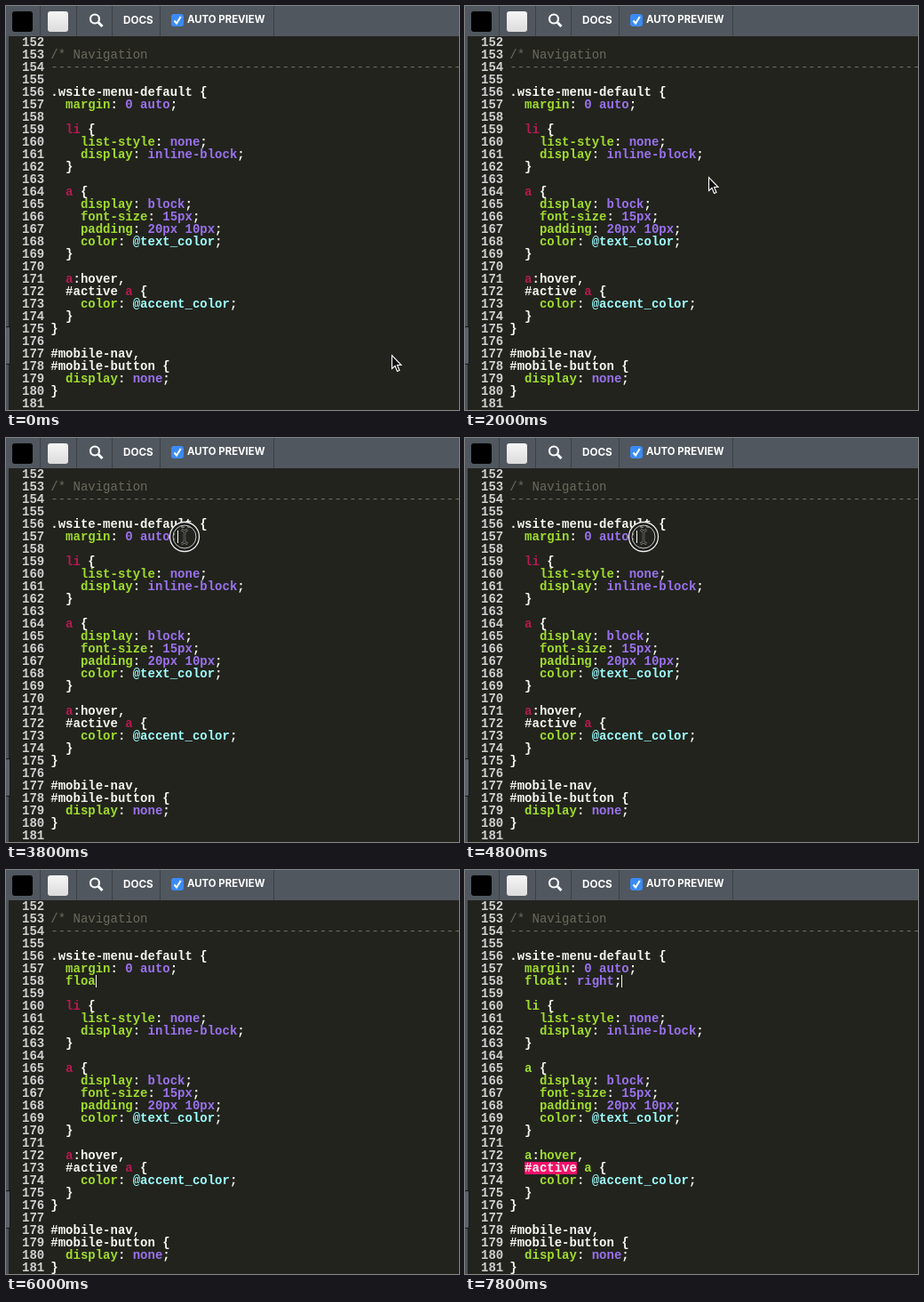
These frames come from a looping animation (510x454 px, 8 s). An HTML page with a canvas:

```html
<!DOCTYPE html>
<html lang="en">
<head>
<meta charset="utf-8">
<title>Code editor</title>
<style>
html, body { margin: 0; width: 510px; height: 454px; overflow: hidden; background: #22231d; }
canvas { display: block; }
</style>
</head>
<body>
<canvas id="stage" width="510" height="454"></canvas>
<script>
const ctx = document.getElementById('stage').getContext('2d');
const LOOP = 8000, STEP = 200;
const LEFT = 50.3, CHAR = 8.4, ROW = 14, TOP = 45, FIRST = 152;
const MONO = '14px "Liberation Mono", "Courier New", monospace';
const WHITE = '#f8f8f2', GREEN = '#a0dc2c', PINK = '#b51a52', PURPLE = '#9a72ee',
      CYAN = '#9effff', GRAY = '#6c6a5e', HOT = '#f5106b';

const code = `
/* Navigation
${'-'.repeat(60)}

.wsite-menu-default {
  margin: 0 auto;

  li {
    list-style: none;
    display: inline-block;
  }

  a {
    display: block;
    font-size: 15px;
    padding: 20px 10px;
    color: @text_color;
  }

  a:hover,
  #active a {
    color: @accent_color;
  }
}

#mobile-nav,
#mobile-button {
  display: none;
}
`.split('\n');

// Pointer path: time, x, y
const path = [[0, 434, 392], [1200, 419, 374], [1400, 394, 342], [1600, 350, 287], [1800, 306, 232],
  [2000, 274, 192], [2400, 257, 146], [2600, 235, 128], [2800, 212, 112], [3000, 196, 102]];

function box(x, y, w, h, fill, r = 0) {
  ctx.fillStyle = fill;
  ctx.beginPath();
  ctx.roundRect(x, y, w, h, r);
  ctx.fill();
}

function line(points, color, width) {
  ctx.strokeStyle = color;
  ctx.lineWidth = width;
  ctx.beginPath();
  points.forEach(p => ctx.lineTo(...p));
  ctx.stroke();
}

function circle(x, y, r, color, width) {
  ctx.strokeStyle = color;
  ctx.lineWidth = width;
  ctx.beginPath();
  ctx.arc(x, y, r, 0, 7);
  ctx.stroke();
}

function label(text, x, y, size) {
  ctx.font = `700 ${size}px Inter, sans-serif`;
  ctx.fillStyle = '#fff';
  ctx.fillText(text, x, y);
}

function toolbar() {
  box(0, 0, 510, 34, '#50575e');
  for (const x of [38, 79, 119, 173, 301]) box(x, 0, 1, 34, '#3a4046');
  box(7, 6, 23, 23, '#000', 3);
  const shade = ctx.createLinearGradient(0, 6, 0, 29);
  shade.addColorStop(0, '#f6f6f6');
  shade.addColorStop(1, '#dcdcdc');
  box(47, 6, 23, 23, shade, 3);
  circle(100, 14.5, 5, '#fff', 2.2);
  line([[103.8, 18.3], [108.5, 23]], '#fff', 3);
  label('DOCS', 132, 20, 11.7);
  box(186, 9, 14, 14, '#3b8bf5', 3);
  line([[189.5, 16.5], [192, 19.5], [196.8, 12]], '#fff', 2);
  label('AUTO PREVIEW', 204, 19, 11.4);
}

// Splits a line into [text, color, background] parts
function tokens(text, row, broken) {
  if (row === 1 || row === 2) return [[text, GRAY]];
  const rule = text.match(/^(\s*[\w-]+)(?:(:)( .*?)?(;?))?$/);
  if (rule) {
    const [, name, colon = '', value = '', end = ''] = rule;
    return [[name, GREEN], [colon, WHITE], [value, value.includes('@') ? CYAN : PURPLE], [end, WHITE]];
  }
  return (text.match(/[.#][\w-]+|[\w-]+|[^\w.#]+/g) || []).map((part, i, all) => {
    const pseudo = all[i - 1] === ':';
    if (/^\w/.test(part)) return [part, broken ? GREEN : pseudo ? WHITE : PINK];
    return [part, WHITE, broken && part === '#active' && HOT];
  });
}

function editor(lines, broken) {
  lines.forEach((text, row) => {
    const y = TOP + row * ROW;
    ctx.font = 'bold ' + MONO;
    ctx.fillStyle = '#d0d0d0';
    ctx.fillText(FIRST + row, 18, y);
    if (row === 1 || row === 2) ctx.font = MONO;
    let x = LEFT;
    for (const [part, color, back] of tokens(text, row, broken)) {
      const width = part.length * CHAR;
      if (back) box(x, y - 11, width, ROW, back);
      ctx.fillStyle = color;
      ctx.fillText(part, x, y);
      x += width;
    }
  });
}

function caret(row, col) {
  box(Math.round(LEFT + col * CHAR), TOP + row * ROW - 11, 1, ROW, WHITE);
}

function arrow(t) {
  const next = path.findIndex(p => p[0] > t);
  const b = path.at(next), a = next > 0 ? path[next - 1] : b;
  const k = a === b ? 0 : (t - a[0]) / (b[0] - a[0]);
  ctx.save();
  ctx.translate(a[1] + (b[1] - a[1]) * k + .5, a[2] + (b[2] - a[2]) * k + .5);
  ctx.beginPath();
  [[0, 0], [0, 15], [3.5, 12], [6, 18], [8.5, 17], [6, 11], [10.5, 11]].forEach(p => ctx.lineTo(...p));
  ctx.closePath();
  ctx.fillStyle = '#111';
  ctx.fill();
  ctx.strokeStyle = '#fff';
  ctx.lineWidth = 1.1;
  ctx.stroke();
  ctx.restore();
}

function beam(x, y) {
  for (const [color, width] of [['#777', 2.6], ['#111', 1]]) {
    line([[x, y - 6], [x, y + 6]], color, width);
    for (const s of [-1, 1])
      line([[x - 3.5, y + 8 * s], [x, y + 6 * s], [x + 3.5, y + 8 * s]], color, width);
  }
}

function ring(x, y, r, alpha) {
  ctx.globalAlpha = alpha;
  ctx.fillStyle = 'rgba(34,35,29,.55)';
  ctx.beginPath();
  ctx.arc(x, y, r, 0, 7);
  ctx.fill();
  circle(x, y, r - 2, '#181915', 4);
  circle(x, y, r, '#eee', 1.3);
  circle(x, y, r - 3.5, '#ccc', 1);
  ctx.globalAlpha = 1;
}

function draw(t) {
  const lines = code.slice();
  const typed = 'float: right;'.slice(0, Math.max(0, (t - 5200) / STEP));
  if (t >= 5000) lines.splice(6, 0, '  ' + typed);

  box(0, 0, 510, 454, '#22231d');
  editor(lines.slice(0, 30), t >= 6400);
  box(0, 34, 3, 420, '#4d535b');
  box(0, 360, 5, 43, '#16171a', 1);
  box(0, 361, 4, 41, '#5b626b', 1);
  toolbar();

  if (t >= 5000) return caret(6, 2 + typed.length);
  if (t < 3400) return arrow(t);
  if (t >= 3800 && t < 4200 || t >= 4800) ring(201, 111, 16.5, 1);
  else if (t >= 4200 && t < 4600) ring(201, 112, 22, .5);
  if (t >= 3800) caret(5, 17);
  beam(201, 111);
}

function frame(now) {
  draw(Math.floor(now % LOOP / STEP) * STEP);
  requestAnimationFrame(frame);
}
requestAnimationFrame(frame);
</script>
</body>
</html>
```
